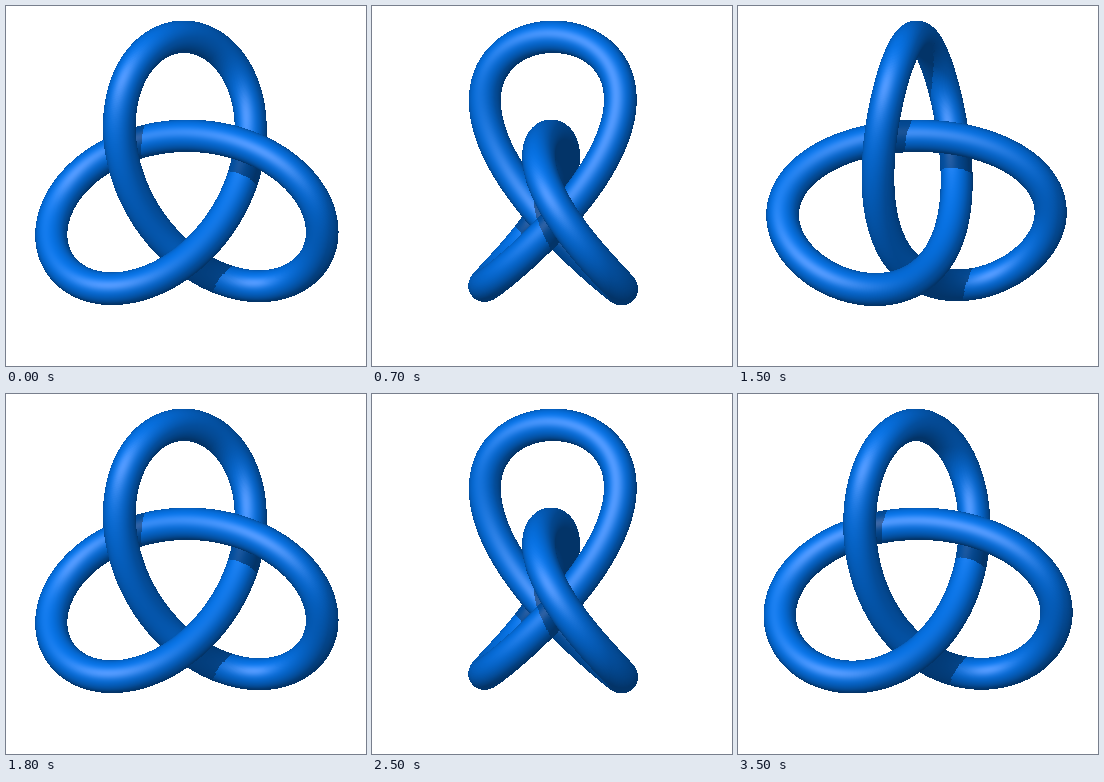
These frames come from a looping animation (360x360 px, 3600 ms). An HTML page with a canvas:

```html
<!DOCTYPE html>
<html lang="en">
<head>
<meta charset="utf-8">
<title>Rotating trefoil knot</title>
<style>
  html, body { margin: 0; width: 100%; height: 100%; overflow: hidden; background: #fff; }
  canvas { display: block; }
</style>
</head>
<body>
<canvas id="stage" width="360" height="360"></canvas>
<script>
const SIZE = 360, SAMPLES = 900;
const SCALE = 49.5, RADIUS = 16.2, CAMERA = 75;
const CENTER_X = 179.8, CENTER_Y = 179.3;
const STEP_MS = 100, STEPS = 18;   // half a turn looks the same as a whole one
const SHADOW_BIAS = 8;

const ctx = document.getElementById('stage').getContext('2d');
const dot = (a, b) => a[0] * b[0] + a[1] * b[1] + a[2] * b[2];
const cross = (a, b) => [a[1] * b[2] - a[2] * b[1], a[2] * b[0] - a[0] * b[2], a[0] * b[1] - a[1] * b[0]];
const unit = a => { const l = Math.hypot(...a) || 1; return a.map(v => v / l); };

// x right, y down, z toward the viewer
function makeLight(direction, diffuse, shine) {
  const dir = unit(direction);
  return { dir, diffuse, shine, half: unit([dir[0], dir[1], dir[2] + 1]) };
}
const key = makeLight([-0.1, -0.36, 1], 0.36, 0.4);      // casts shadows
const fill = makeLight([-0.65, -0.4, 0.65], 0.22, 0.6);
const AMBIENT = 0.43;
const BASE = [6, 121, 243], GLOSS = [92, 44, 22];

const lightX = unit(cross([0, 1, 0], key.dir));
const lightY = cross(key.dir, lightX);
const toLight = p => [dot(p, lightX), dot(p, lightY), dot(p, key.dir)];

function knotPoint(t, angle) {
  const x = Math.sin(t) + 2 * Math.sin(2 * t);
  const y = Math.cos(t) - 2 * Math.cos(2 * t);
  const z = Math.sin(3 * t);
  const c = Math.cos(angle), s = Math.sin(angle);
  const depth = x * s + z * c;
  const zoom = CAMERA / (CAMERA - depth);
  return { p: [(x * c - z * s) * SCALE * zoom, y * SCALE * zoom, depth * SCALE], r: RADIUS * zoom };
}

// Depth buffer of the spheres that sweep out the tube
function sweep(balls) {
  const depth = new Float32Array(SIZE * SIZE).fill(-1e9);
  const owner = new Int16Array(SIZE * SIZE).fill(-1);
  balls.forEach(({ p, r }, i) => {
    const cx = p[0] + CENTER_X, cy = p[1] + CENTER_Y;
    const x0 = Math.max(0, Math.floor(cx - r)), x1 = Math.min(SIZE - 1, Math.ceil(cx + r));
    const y0 = Math.max(0, Math.floor(cy - r)), y1 = Math.min(SIZE - 1, Math.ceil(cy + r));
    for (let y = y0; y <= y1; y++) {
      const dy = y + 0.5 - cy;
      for (let x = x0; x <= x1; x++) {
        const dx = x + 0.5 - cx, h = r * r - dx * dx - dy * dy;
        if (h < 0) continue;
        const z = p[2] + Math.sqrt(h), k = y * SIZE + x;
        if (z > depth[k]) { depth[k] = z; owner[k] = i; }
      }
    }
  });
  return { depth, owner };
}

function render(angle) {
  const balls = Array.from({ length: SAMPLES }, (_, i) => knotPoint(i / SAMPLES * 2 * Math.PI, angle));
  const tangents = balls.map((_, i) => {
    const a = balls[(i + SAMPLES - 1) % SAMPLES].p, b = balls[(i + 1) % SAMPLES].p;
    return unit(b.map((v, j) => v - a[j]));
  });
  const view = sweep(balls);
  const shade = sweep(balls.map(({ p, r }) => ({ p: toLight(p), r })));

  const image = ctx.createImageData(SIZE, SIZE);
  image.data.fill(255);
  for (let k = 0; k < SIZE * SIZE; k++) {
    const i = view.owner[k];
    if (i < 0) continue;
    const point = [k % SIZE + 0.5 - CENTER_X, Math.floor(k / SIZE) + 0.5 - CENTER_Y, view.depth[k]];

    // Drop the part along the tube so the surface is smooth
    const out = point.map((v, j) => v - balls[i].p[j]);
    const along = dot(out, tangents[i]);
    const normal = unit(out.map((v, j) => v - along * tangents[i][j]));

    const [u, v, d] = toLight(point);
    const cell = Math.floor(v + CENTER_Y) * SIZE + Math.floor(u + CENTER_X);
    const shadowed = shade.depth[cell] > d + SHADOW_BIAS;

    let glow = AMBIENT, shine = 0;
    for (const light of shadowed ? [fill] : [key, fill]) {
      const facing = dot(normal, light.dir);
      if (facing <= 0) continue;
      glow += light.diffuse * facing;
      shine += light.shine * Math.max(0, dot(normal, light.half)) ** 16;
    }
    BASE.forEach((c, j) => image.data[4 * k + j] = c * glow + GLOSS[j] * shine);
  }
  return image;
}

const cache = [];
let shown = -1;

function draw() {
  const step = Math.floor(performance.now() / STEP_MS) % STEPS;
  if (step !== shown) {
    cache[step] ||= render(step * Math.PI / STEPS);
    ctx.putImageData(cache[step], 0, 0);
    shown = step;
  }
  requestAnimationFrame(draw);
}
draw();
</script>
</body>
</html>
```
